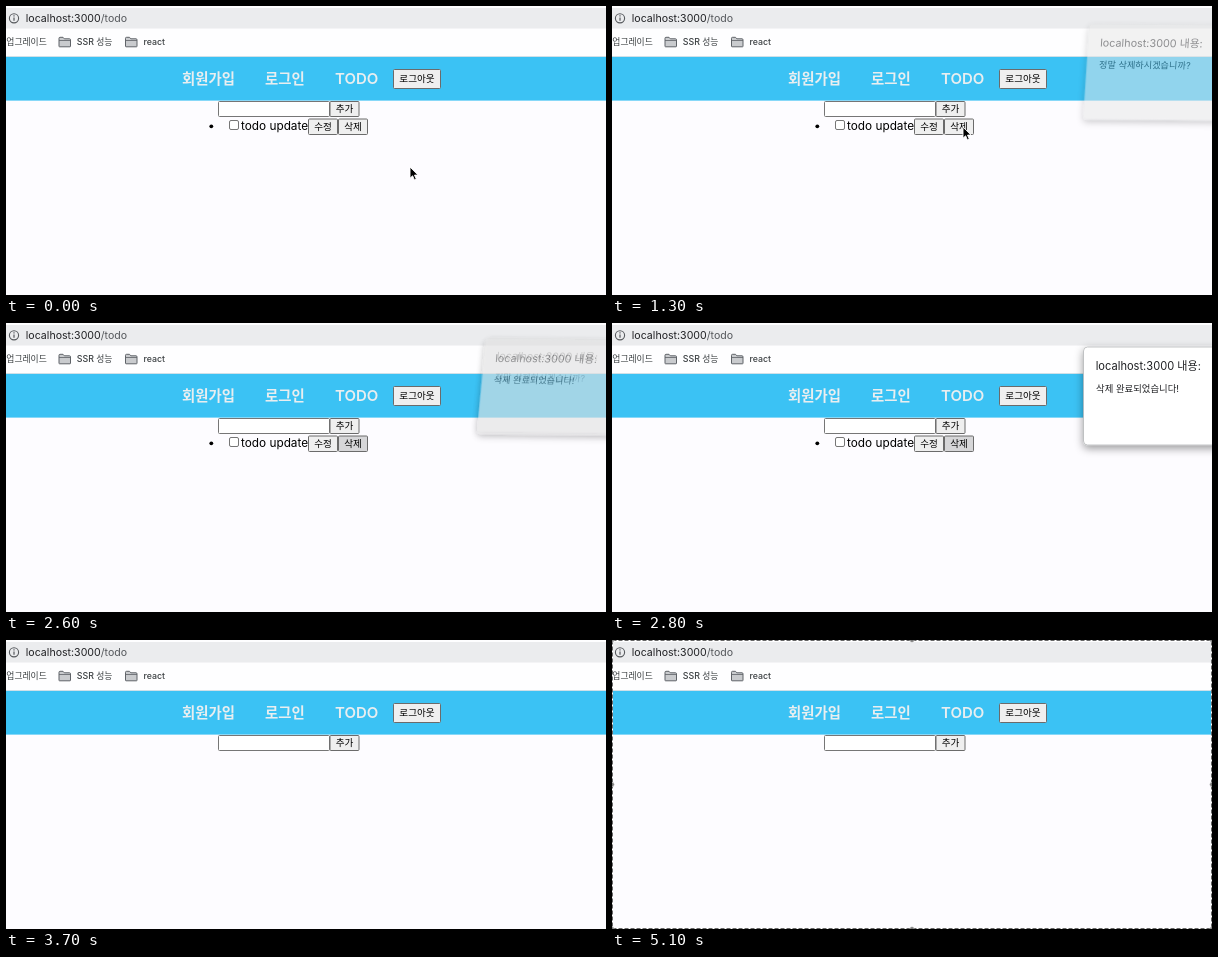
Animation of 600 by 289 pixels, one loop 5900 ms. Source, as an HTML page:

```html
<!DOCTYPE html>
<html lang="ko">
<head>
<meta charset="utf-8">
<title>Todo</title>
<style>
html, body { margin: 0; width: 100%; height: 100%; overflow: hidden; background: #fdfcff; }
svg { display: block; width: 100vw; height: 100vh; }
text { font-family: Inter, "Noto Sans CJK KR", "Noto Sans CJK", sans-serif; white-space: pre; }
.nav { font-size: 14.4px; font-weight: 600; fill: #e9eef0; }
.bookmark { font-size: 8.8px; font-weight: 500; fill: #3c4043; }
.label { font-size: 9.6px; fill: #000; text-anchor: middle; }
.button { fill: #efefef; stroke: #6b6b6b; }
.title { font-size: 11.1px; fill: #202124; }
.message { font-size: 9.4px; fill: #202124; }
</style>
</head>
<body>
<svg viewBox="0 0 600 289" preserveAspectRatio="none">
  <defs>
    <filter id="shadow" x="-20%" y="-30%" width="140%" height="170%">
      <feDropShadow dx="0" dy="3" stdDeviation="4" flood-color="#000" flood-opacity=".4"/>
    </filter>
    <g id="folder" stroke="#5f6368" stroke-width="1" stroke-linejoin="round">
      <path d="M.5 9.5V1.5q0-1 1-1h3l1.3 1.5h5.2q1 0 1 1v6.5q0 .5-.5.5H1q-.5 0-.5-.5z" fill="#c9cbce"/>
      <path d="M.5 3.7H12" fill="none" stroke-width=".8"/>
    </g>
  </defs>

  <rect width="600" height="289" fill="#fdfcff"/>
  <rect width="600" height="51" fill="#fefeff"/>
  <rect y="2" width="600" height="20.5" fill="#ebecee"/>
  <g fill="none" stroke="#55585c">
    <circle cx="8" cy="12.3" r="4.6" stroke-width="1.1"/>
    <path d="M8 11.5v3.3M8 9.3v1.2" stroke-width="1.2"/>
  </g>
  <text x="19.8" y="16" font-size="10.6" fill="#202124">localhost:3000<tspan fill="#55585c">/todo</tspan></text>

  <text class="bookmark" x="0.300" y="39.2">업그레이드</text>
  <use href="#folder" x="52.5" y="30.800"/>
  <text class="bookmark" x="70.800" y="39.2">SSR 성능</text>
  <use href="#folder" x="119" y="30.800"/>
  <text class="bookmark" x="137.5" y="39.2">react</text>
  <rect y="50" width="600" height="1" fill="#cfe0e8"/>

  <rect y="51" width="600" height="43.6" fill="#3bc2f4"/>
  <text class="nav" x="176" y="78">회원가입</text>
  <text class="nav" x="259" y="78">로그인</text>
  <text class="nav" x="329" y="78" style="font-size:15px">TODO</text>
  <g id="page"></g>
  <g id="item">
    <circle cx="205.3" cy="120.3" r="1.9"/>
    <rect x="223.5" y="114.5" width="9" height="9" rx="1.5" fill="#fff" stroke="#767676"/>
    <text x="235" y="124" font-size="11.8">todo update</text>
  </g>
  <g id="dialogs"></g>
  <path id="cursor" d="M0 0V11.2L2.6 8.800L4.4 12.9L6.3 12.1L4.5 8.1H8z"
    fill="#000" stroke="#fff" stroke-width=".9" stroke-linejoin="round"/>
  <g id="selection">
    <rect x=".5" y=".5" width="599" height="288" fill="none" stroke="#fff"/>
    <rect x=".5" y=".5" width="599" height="288" fill="none" stroke="#666" stroke-dasharray="4 2"/>
  </g>
</svg>
<script>
const LOOP = 5900, STEP = 100;
const $ = id => document.getElementById(id);

function add(parent, tag, attrs, text) {
  const el = document.createElementNS("http://www.w3.org/2000/svg", tag);
  for (const key in attrs) el.setAttribute(key, attrs[key]);
  if (text) el.textContent = text;
  return parent.appendChild(el);
}

function addButton(parent, x, y, width, height, label) {
  const box = add(parent, "rect", { class: "button", x: x + .5, y: y + .5, width: width - 1, height: height - 1, rx: 1 });
  add(parent, "text", { class: "label", x: x + width / 2, y: y + height / 2 + 3.2 }, label);
  return box;
}

function addDialog(message) {
  const group = add($("dialogs"), "g", {});
  const panel = add(group, "rect", { x: 471.5, y: 24, width: 210, height: 98, rx: 4, stroke: "#b4b6b8", "stroke-width": .8, filter: "url(#shadow)" });
  add(group, "text", { class: "title", x: 483.7, y: 47.3 }, "localhost:3000 내용:");
  add(group, "text", { class: "message", x: 484, y: 69.3 }, message);
  return { group, panel };
}

addButton($("page"), 387, 63, 48, 20, "로그아웃");
add($("page"), "rect", { x: 212.5, y: 95.5, width: 111, height: 15, rx: 1, fill: "#fff", stroke: "#767676" });
addButton($("page"), 323.5, 95, 30, 16, "추가");
addButton($("item"), 302, 112.5, 30, 16.5, "수정");
const removeButton = addButton($("item"), 332, 112.5, 30, 16.5, "삭제");
const question = addDialog("정말 삭제하시겠습니까?");
const notice = addDialog("삭제 완료되었습니다!");

for (const x of [0, 300, 600])
  for (const y of [0, 144.5, 289])
    if (x !== 300 || y !== 144.5)
      add($("selection"), "circle", { cx: x, cy: y, r: 2.2, fill: "#777", stroke: "#ddd", "stroke-width": .5 });

// Rows are [time, ...values], interpolated linearly.
function track(rows, t) {
  const next = rows.findIndex(row => row[0] > t);
  if (next === 0) return rows[0].slice(1);
  if (next < 0) return rows[rows.length - 1].slice(1);
  const a = rows[next - 1], b = rows[next], u = (t - a[0]) / (b[0] - a[0]);
  return a.slice(1).map((v, i) => v + (b[i + 1] - v) * u);
}

const pointer = [[0, 404, 161], [300, 393, 152], [600, 369, 134], [1000, 353, 122], [1200, 351, 121],
  [1600, 351, 121], [1700, 366, 117], [1800, 402, 106], [1900, 444, 95]];
const questionFade = [[1200, 0], [1300, .5], [1400, .87], [1500, 1], [2400, 1], [2500, .9], [2600, .32], [2700, 0]];
const noticeFade = [[2500, 0], [2600, .44], [2700, .87], [2800, 1], [3400, 1], [3500, .93], [3600, .45], [3700, 0]];

function show(el, visible) {
  el.setAttribute("visibility", visible ? "visible" : "hidden");
}

// A fading dialog lifts, leans back and loses its light.
function poseDialog({ group, panel }, fade) {
  const k = Math.min(1.3, ((1 - fade) / .56) ** 2);
  const light = 255 - 30 * Math.min(1, k);
  show(group, fade > 0);
  group.setAttribute("opacity", fade);
  group.setAttribute("transform", `translate(${471 + 7.5 * k} ${24 - 7.7 * k})
    matrix(${1 - .03 * k} ${.01 * k} ${-.08 * k} ${1 - .035 * k} 0 0) translate(-471 -24)`);
  panel.setAttribute("fill", `rgb(${light} ${light} ${light})`);
  panel.setAttribute("stroke-opacity", Math.max(0, 1 - k));
}

function draw(time) {
  const t = Math.floor(time % LOOP / STEP) * STEP;
  const [x, y] = track(pointer, t);
  $("cursor").setAttribute("transform", `translate(${x} ${y})`);
  show($("cursor"), t < 2000);
  poseDialog(question, track(questionFade, t)[0]);
  poseDialog(notice, track(noticeFade, t)[0]);
  removeButton.style.fill = t >= 2500 ? "#d6d6d8" : "";
  show($("item"), t < 3700);
  show($("selection"), t >= 5100);
}

const start = performance.now();
function tick() {
  draw(performance.now() - start);
  requestAnimationFrame(tick);
}
tick();
</script>
</body>
</html>
```
